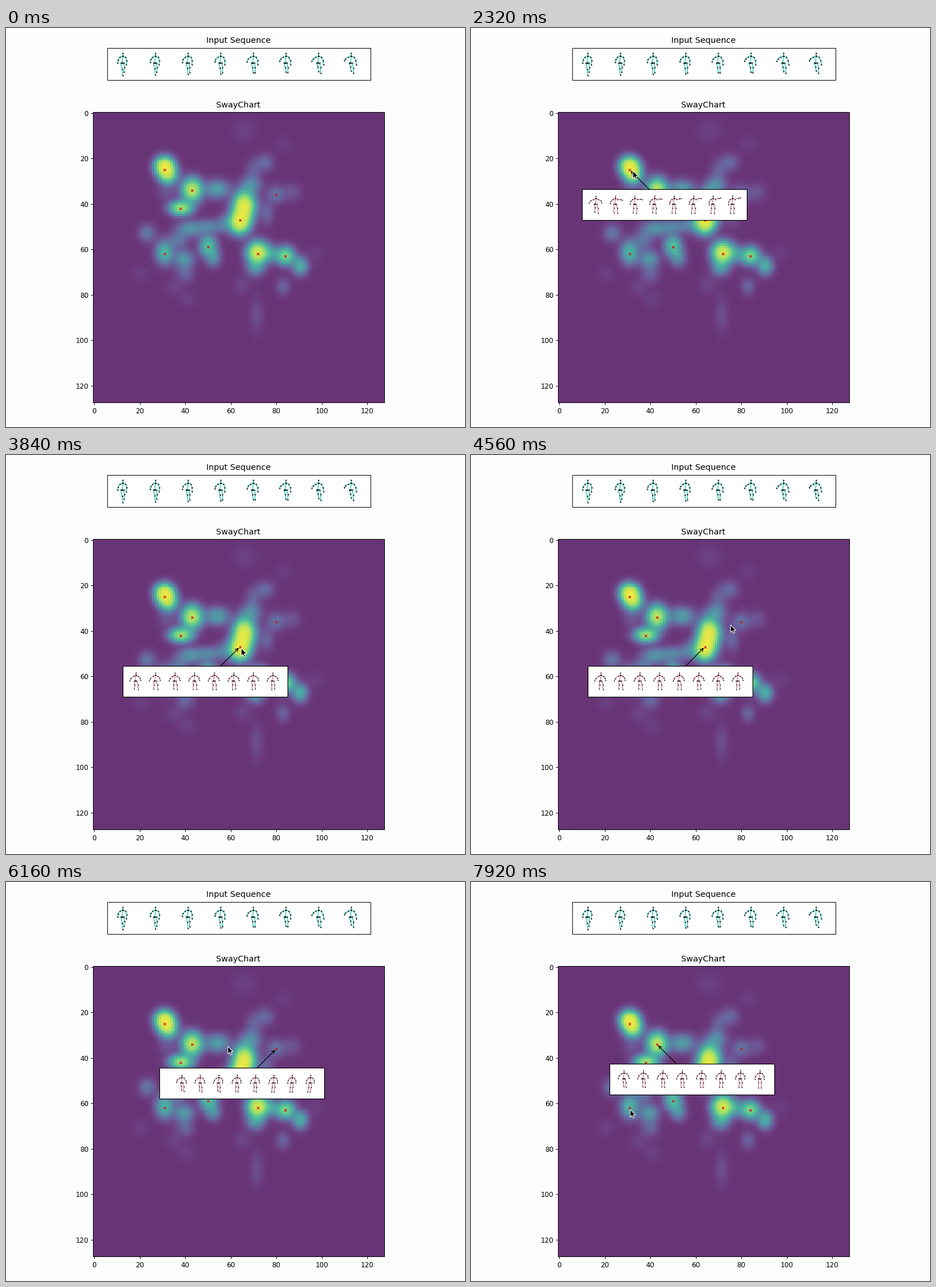
Recreate the animation shown at these times as a matplotlib script. Size 802 by 698 pixels, loop 8 s.

```python
import numpy as np
import matplotlib.pyplot as plt
from matplotlib.animation import FuncAnimation
from matplotlib.patches import FancyArrowPatch, Polygon, Rectangle

W, H, FRAMES, STEP = 802, 698, 100, 80
PX = 0.72  # points per pixel at 100 dpi
CELL, X0, Y0 = 3.972, 154.3, 149.0

plt.rcParams["font.family"] = "DejaVu Sans"
fig = plt.figure(figsize=(W / 100, H / 100), dpi=100, facecolor="#fdfdfd")


# ---- density map -----------------------------------------------------------
gx, gy = np.meshgrid(np.arange(128), np.arange(128))


def bump(x, y, strength, w=2.6, h=2.6):
    return strength * np.exp(-((gx - x) / w) ** 2 / 2 - ((gy - y) / h) ** 2 / 2)


BRIGHT = [(31, 23.5, 2.6), (32.5, 27.3, 1.6), (72, 61.5, 2.4, 2.9, 3),
          (43, 34, 2, 2.8, 3.2), (38.2, 42, 1.65, 3.2, 2),
          (66, 41, 2.6, 3, 3.8), (64, 48, 2.6, 2.9, 3.2),
          (84, 63, 1.4), (90.5, 67.5, 0.75, 2.2), (71, 68, 0.55)]
SOFT = [(54, 33.7, 0.6, 3.5), (69, 32, 0.42, 3), (42, 51, 0.5, 3.6, 2.3),
        (50, 50, 0.38, 3.4, 2), (57, 49, 0.3), (50, 58.5, 0.95, 2.5, 3),
        (52.3, 64, 0.45, 2.2), (31, 61.5, 0.85, 2.5, 3.4),
        (39.5, 64.5, 0.55, 2.8), (37, 56, 0.3), (78, 62, 0.4, 2)]
FAINT = [(23.3, 53, 0.3), (40, 71, 0.2), (70, 25.5, 0.17, 2.2, 3.2),
         (75, 22, 0.24), (80, 36, 0.28), (87, 35, 0.13), (76, 44, 0.2, 2, 3.5),
         (83, 76.5, 0.2, 2), (71.5, 89, 0.1, 2, 5.2), (66, 7.5, 0.05, 3.8, 3.6),
         (83, 14, 0.04), (65, 76, 0.07), (41, 82, 0.05), (35, 77, 0.06),
         (20.5, 71, 0.05), (97, 62, 0.04), (32, 35, 0.12)]
density = 1 - np.exp(-sum(bump(*b) for b in BRIGHT + SOFT + FAINT))


def pixel_axes(x, y, w, h):
    ax = fig.add_axes([x / W, 1 - (y + h) / H, w / W, h / H])
    for spine in ax.spines.values():
        spine.set_linewidth(0.72)
    return ax


size = 128 * CELL
heat = pixel_axes(X0 - CELL / 2, Y0 - CELL / 2, size, size)
heat.imshow(density, cmap="viridis", alpha=0.8, vmin=0, vmax=0.99,
            interpolation="nearest", aspect="auto")
heat.set_xticks(range(0, 121, 20))
heat.set_yticks(range(0, 121, 20))
heat.tick_params(labelsize=8.64, length=3, width=0.69, pad=3)

# Overlay in stage pixels, y downwards
stage = fig.add_axes([0, 0, 1, 1])
stage.set(xlim=(0, W), ylim=(H, 0))
stage.axis("off")


def to_px(x, y):
    return X0 + CELL * x, Y0 + CELL * y


MODES = [(31, 25), (43, 34), (38, 42), (64, 47), (80, 36),
         (31, 62), (50, 59), (72, 62), (84, 63)]
mx, my = np.array([to_px(*m) for m in MODES]).T
stage.plot(mx, my, "x", color="#d01018", ms=5 * PX, mew=1.2 * PX)

for text, baseline in (("Input Sequence", 26), ("SwayChart", 139.5)):
    stage.text(406, baseline, text, fontsize=10.37, ha="center", va="baseline")


# ---- stick figures ---------------------------------------------------------
TORSO = np.array([(1, -17), (1, -12), (-4, -10), (6, -10), (0, 0),
                  (-2.5, 0), (3, 0)])


def skeleton(ends, scale):
    """Chains of joints for given left/right hands and left/right feet."""
    head, neck, sl, sr, hip, pl, pr = TORSO * scale
    hl, hr, fl, fr = ends
    return [(head, neck, hip),
            (neck, sl, (sl + hl) / 2 + (-1.2, -0.4), hl),
            (neck, sr, (sr + hr) / 2 + (1.2, -0.4), hr),
            (hip, pl, (pl + fl) / 2 + (0.6, -0.5), fl),
            (hip, pr, (pr + fr) / 2 + (0.8, -0.5), fr)]


def draw_figures(x, y, gap, start, end, scale, color, width, dot, rate, z):
    start, end = np.array(start), np.array(end)
    points = []
    for k in range(8):
        ends = start + (end - start) * (k / 7) ** rate
        for chain in skeleton(ends, scale):
            points += [p + np.array((x + k * gap, y)) for p in chain]
            points.append((np.nan, np.nan))
    xs, ys = np.array(points).T
    bones, = stage.plot(xs, ys, color=color, lw=width * PX, zorder=z)
    dots, = stage.plot(xs, ys, "o", color="#151515", ms=dot * PX, mew=0,
                       zorder=z + 0.1)
    return [bones, dots]


stage.add_patch(Rectangle((176.5, 34.5), 460, 56, fc="white", ec="black", lw=PX))
draw_figures(203, 61, 57, [(-8, 0), (7, 3), (1, 22), (3, 16)],
             [(-11, -4), (10, 3), (1, 14), (5, 18)],
             1, "#45c9b9", 1.6, 2.4, 1, 3)


# ---- popups ----------------------------------------------------------------
def popup(mode, side, inset, gap, start, end, rate=1):
    tip = np.array(to_px(*mode))
    centre = tip + (60.5 * side, 60.5)
    left, top = centre - (144, 27)
    arrow = FancyArrowPatch(centre, tip, arrowstyle="->", mutation_scale=9.5,
                            shrinkA=0, shrinkB=1.7, lw=1.2 * PX, color="black",
                            zorder=5)
    box = Rectangle((left, top), 288, 54, fc="white", ec="black",
                    lw=1.2 * PX, zorder=6)
    stage.add_patch(arrow)
    stage.add_patch(box)
    return [arrow, box] + draw_figures(
        left + inset, centre[1] - 1, gap, start, end, 0.82,
        "#b8596f", 1.0, 1.9, rate, 7)


# Keyed by the time each one opens
popups = {
    1760: popup((31, 25), 1, 23.5, 34.1, [(-11, -2), (11, -2), (-1, 14), (5, 16)],
                [(-6, 1), (14, -11), (-3, 16), (3, 16)], 0.35),
    3680: popup((64, 47), -1, 22, 34.2, [(-10, 0), (9, -1), (-2, 14), (5, 15)],
                [(-9, 0), (10, -1), (-1, 15), (4, 14)]),
    5120: popup((80, 36), -1, 39, 32.1, [(-9, -1), (8, 0), (0, 13), (4, 15)],
                [(-7, 1), (7, 0), (-4, 16), (0, 16)]),
    6720: popup((43, 34), 1, 25, 33.9, [(-10, 0), (9, -1), (0, 14), (4, 15)],
                [(-8, 1), (8, 1), (-2, 16), (3, 16)], 0.6),
}

# ---- pointer ---------------------------------------------------------------
SHAPE = np.array([(0, 0), (0, 13.2), (3, 10.4), (5, 15), (7.2, 14),
                  (5.2, 9.6), (9.3, 9.4)])
pointer = Polygon(SHAPE, closed=True, fc="black", ec="white", lw=PX, zorder=20)
stage.add_patch(pointer)

# leave, arrive, destination, sideways bow
ENTRY_TIME, ENTRY = 640, (330, 400)
MOVES = [(640, 1280, (283, 250), 0), (2400, 3200, (411, 338), 0),
         (4080, 4800, (475, 292), 10.8), (5760, 6480, (325, 284), 0),
         (7200, 7760, (278, 398), 0)]


def pointer_at(t):
    pos = np.array(ENTRY, float)
    for leave, arrive, goal, bow in MOVES:
        if t <= leave:
            break
        u = min(1, (t - leave) / (arrive - leave))
        s = u * u * (3 - 2 * u)
        d = np.array(goal) - pos
        normal = np.array([d[1], -d[0]]) / np.hypot(*d)
        pos = pos + d * s + normal * bow * 4 * s * (1 - s)
    return pos


def update(i):
    t = i * STEP
    current = max((start for start in popups if t >= start), default=None)
    for start, artists in popups.items():
        for artist in artists:
            artist.set_visible(start == current)
    pointer.set_visible(t >= ENTRY_TIME)
    pointer.set_xy(SHAPE + pointer_at(t))
    return []


anim = FuncAnimation(fig, update, frames=FRAMES, interval=STEP,
                     repeat=True, repeat_delay=0)
plt.show()
```
